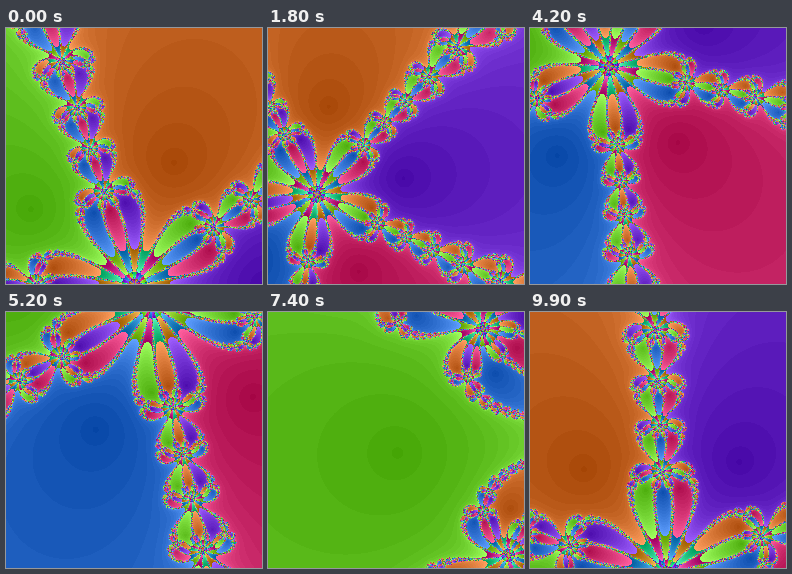
Write an HTML page with a canvas that moves like this. It is 256x256 px and loops after 10 s.

```html
<!DOCTYPE html>
<html lang="en">
<head>
<meta charset="utf-8">
<title>Newton fractal</title>
<style>
  html, body { margin: 0; width: 100%; height: 100%; overflow: hidden; }
  canvas { display: block; width: 100vw; height: 100vh; image-rendering: pixelated; }
</style>
</head>
<body>
<canvas id="stage" width="256" height="256"></canvas>
<script>
const SIZE = 256, HALF = SIZE / 2;
const STEP_MS = 100, STEPS = 100;
const MAX_ITERATIONS = 64;
const TOLERANCE = 2.5e-5;   // squared residual |z^5 - 1|^2
const SHADE = 5;            // brightness added per iteration, wrapping at 256

// One base colour per fifth root of unity, counter-clockwise from 1.
const BASE = [[64, 0, 160], [160, 64, 0], [64, 160, 0], [0, 64, 160], [160, 0, 64]];

const ctx = document.getElementById('stage').getContext('2d');
const image = ctx.createImageData(SIZE, SIZE);
const pixels = new Uint32Array(image.data.buffer);

// Colour lookup: root and iteration count to a packed ABGR pixel.
const palette = BASE.map(rgb =>
  Uint32Array.from({ length: MAX_ITERATIONS + 1 }, (_, n) => {
    const [r, g, b] = rgb.map(c => (c + SHADE * n) & 255);
    return (255 << 24) | (b << 16) | (g << 8) | r;
  }));

// Iterates z -> (4 z^5 + 1) / (5 z^4) until z settles on a root of z^5 = 1.
function newtonColour(x, y) {
  let n = 0;
  for (; n < MAX_ITERATIONS; n++) {
    const x2 = x * x - y * y, y2 = 2 * x * y;
    const x4 = x2 * x2 - y2 * y2, y4 = 2 * x2 * y2;
    const x5 = x4 * x - y4 * y, y5 = x4 * y + y4 * x;
    if ((x5 - 1) * (x5 - 1) + y5 * y5 < TOLERANCE) break;
    const d = 5 * (x4 * x4 + y4 * y4);
    if (d < 1e-30) { n = MAX_ITERATIONS; break; }
    const a = 4 * x5 + 1, b = 4 * y5;
    x = (a * x4 + b * y4) / d;
    y = (b * x4 - a * y4) / d;
  }
  const root = (Math.round(Math.atan2(y, x) * 5 / (2 * Math.PI)) + 5) % 5;
  return palette[root][n];
}

// The view circles the origin while it zooms and the roots turn slowly.
function draw(step) {
  const phase = 2 * Math.PI * step / STEPS;
  const centreX = Math.sin(phase), centreY = Math.cos(phase);
  const scale = (1 + 0.5 * Math.sin(phase)) / HALF;
  const turn = 0.01 * step;
  const c = Math.cos(turn), s = Math.sin(turn);
  for (let row = 0, i = 0; row < SIZE; row++) {
    const y = centreY + (HALF - row) * scale;
    for (let col = 0; col < SIZE; col++, i++) {
      const x = centreX + (col - HALF) * scale;
      pixels[i] = newtonColour(x * c + y * s, y * c - x * s);
    }
  }
  ctx.putImageData(image, 0, 0);
}

const start = performance.now();
let shown = -1;

function tick() {
  const step = Math.floor((performance.now() - start) / STEP_MS) % STEPS;
  if (step !== shown) draw(shown = step);
  requestAnimationFrame(tick);
}
tick();
</script>
</body>
</html>
```
